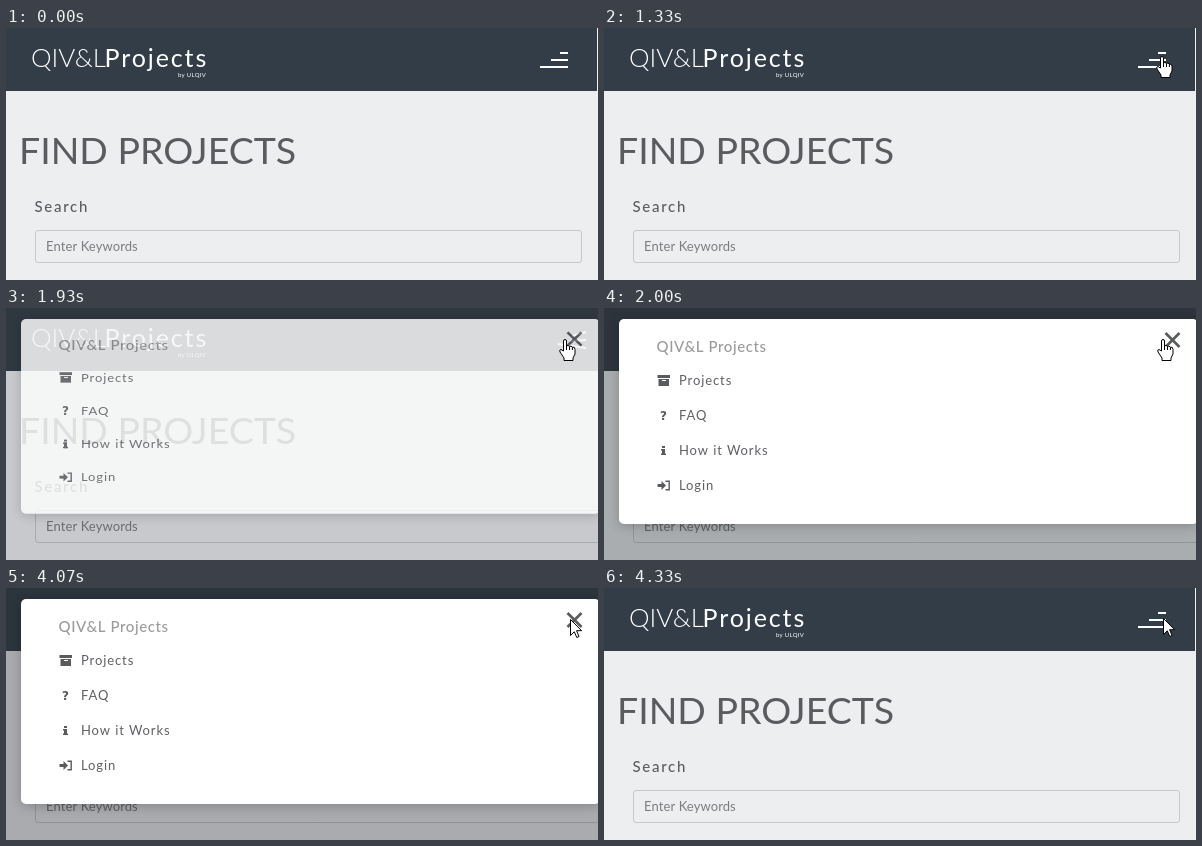
Animation of 592x252 px, one loop 5.54 s. Source, as an HTML page with a canvas:

```html
<!DOCTYPE html>
<html lang="en">
<head>
<meta charset="utf-8">
<title>Find projects</title>
<style>
html, body { margin: 0; width: 100%; height: 100%; overflow: hidden; background: #eceef0; }
canvas { display: block; }
</style>
</head>
<body>
<canvas id="stage" width="592" height="252"></canvas>
<script>
const W = 592, H = 252, LOOP = 5540, STEP = 1000 / 15;
const ctx = document.getElementById('stage').getContext('2d');
const layer = document.createElement('canvas');
layer.width = W;
layer.height = H;
const lc = layer.getContext('2d');

const INK = '#595b5f', BG = '#eceef0', BAR = '#333d47';

// Steps on which the dialog opens and closes
const OPEN = 28, CLOSE = 61;
const ALPHA = [[28, .31], [29, .82], [30, 1], [61, 1], [62, .69], [63, .3], [64, .08], [65, 0]];
const SCALE = [[28, .771], [29, .95], [30, 1], [61, 1], [62, .984], [63, .93], [64, .85], [65, .77]];
const SHADE = [[28, .02], [29, .18], [30, .32], [32, .34], [60, .34], [61, .33], [62, .24], [63, .12], [64, .04], [65, 0]];

function at(keys, n) {
  if (n < keys[0][0]) return 0;
  for (let i = 1; i < keys.length; i++) {
    const [a, u] = keys[i - 1], [b, v] = keys[i];
    if (n <= b) return u + (v - u) * (n - a) / (b - a);
  }
  return 0;
}

function text(c, str, x, y, size, weight, color, gap = 0, family = 'Lato, sans-serif') {
  c.font = `${weight} ${size}px ${family}`;
  c.letterSpacing = gap + 'px';
  c.fillStyle = color;
  c.fillText(str, x, y);
}

function box(c, x, y, w, h, r) {
  c.beginPath();
  c.roundRect(x, y, w, h, r);
}

function line(c, x1, y1, x2, y2, width, color) {
  c.beginPath();
  c.moveTo(x1, y1);
  c.lineTo(x2, y2);
  c.lineWidth = width;
  c.strokeStyle = color;
  c.stroke();
}

function burger(right, tilted) {
  const rows = tilted
    ? [[14, 28, 24], [16, 33, 32], [28, 36, 40]]
    : [[8, 25, 25], [17, 32, 32], [28, 39, 39]];
  for (const [len, y1, y2] of rows) line(ctx, right - len, y1, right, y2, 2, '#fff');
}

function page(width, tilted) {
  ctx.fillStyle = BG;
  ctx.fillRect(0, 0, W, H);
  ctx.fillStyle = BAR;
  ctx.fillRect(0, 0, width, 63);
  text(ctx, 'QIV&L', 25, 39, 26, 300, '#fff');
  text(ctx, 'Projects', 98.5, 39, 25, 400, '#fff', 1.9);
  text(ctx, 'by ULQIV', 172, 49, 6, 400, '#fff', .3);
  burger(width - 29, tilted);
  text(ctx, 'FIND PROJECTS', 13, 136, 37.5, 400, INK);
  text(ctx, 'Search', 28.5, 184, 15, 500, INK, 1.7);
  box(ctx, 29.5, 202.5, width - 45, 32, 2.5);
  ctx.lineWidth = 1;
  ctx.strokeStyle = '#c6c9cb';
  ctx.stroke();
  text(ctx, 'Enter Keywords', 40, 223, 13, 400, '#7b7d80', .1);
  ctx.fillStyle = '#f1f1f1';
  if (width < W) ctx.fillRect(width, 0, W - width, H);
}

function icons(c) {
  c.fillStyle = INK;
  c.fillRect(53.5, 67, 12.5, 3);
  c.fillRect(54.5, 71, 10.5, 7);
  c.fillStyle = '#fff';
  c.fillRect(58, 72, 4, 1);
  text(c, '?', 56, 112, 12, 700, INK, 0, '"DejaVu Sans", sans-serif');
  c.fillRect(58, 138, 3, 2);
  c.fillRect(57, 141, 4, 1.5);
  c.fillRect(58, 141, 3, 6);
  c.fillRect(57, 145.5, 5, 1.5);
  c.fillRect(53.5, 176, 4.5, 3);
  c.beginPath();
  c.moveTo(57.5, 173);
  c.lineTo(62, 177.5);
  c.lineTo(57.5, 182);
  c.fill();
  c.beginPath();
  c.moveTo(61.5, 173.2);
  c.lineTo(65.2, 173.2);
  c.lineTo(65.2, 181.8);
  c.lineTo(61.5, 181.8);
  c.lineWidth = 1.4;
  c.strokeStyle = INK;
  c.stroke();
}

function dialog(width, alpha, scale) {
  const c = lc;
  c.clearRect(0, 0, W, H);
  c.save();
  c.translate(0, 11);
  c.scale(1, scale);
  c.translate(0, -11);
  c.save();
  c.shadowColor = 'rgba(0,0,0,.22)';
  c.shadowBlur = 12;
  c.shadowOffsetY = 2;
  c.fillStyle = '#fff';
  box(c, 15, 11, width - 30, 205, 5);
  c.fill();
  c.restore();
  text(c, 'QIV&L Projects', 52.5, 44, 15, 500, '#9b9b9b', .6);
  ['Projects', 'FAQ', 'How it Works', 'Login'].forEach((s, i) =>
    text(c, s, 75, 77 + 35 * i, 13, 400, '#5f6063', .9));
  icons(c);
  const x = width - 40.5, y = 32;
  line(c, x - 7, y - 7, x + 7, y + 7, 2.6, INK);
  line(c, x - 7, y + 7, x + 7, y - 7, 2.6, INK);
  c.restore();
  ctx.globalAlpha = alpha;
  ctx.drawImage(layer, 0, 0);
  ctx.globalAlpha = 1;
}

function paint(path, x, y) {
  ctx.save();
  ctx.translate(x, y);
  ctx.lineJoin = 'round';
  ctx.lineWidth = 1;
  ctx.fillStyle = '#fff';
  ctx.strokeStyle = '#000';
  ctx.fill(path);
  ctx.stroke(path);
  ctx.restore();
}

// Both pointers have their hot spot at 0,0
const ARROW = new Path2D('M.5 .5V16.5L4.3 12.8L6.8 18.5L9 17.5L6.6 11.7H11.6Z');
const HAND = new Path2D('M-1.5 12V2Q-1.5 .5 0 .5T1.5 2V7Q3 5.6 4.5 7.4Q6 6.3 7.4 8.2Q10 7.4 10 10.5V15L8 19V21.5H-1V19L-5 13Q-6 10.5 -4 10.5Z');
const CREASES = new Path2D('M1.5 7V11M4.5 7.4V11M7.4 8.2V11');

function hand(x, y) {
  paint(HAND, x, y);
  paint(CREASES, x, y);
}

function pointer(n) {
  if (n < 7) return;
  if (n < 19) {
    const p = Math.min(1, (n - 7) / 9);
    const x = 553 + 27 * Math.max(0, 1 - p * 1.8) ** 1.5;
    const y = 23 + 173 * (1 - p) ** 1.717;
    paint(ARROW, Math.round(x), Math.round(y));
  } else if (n < 20) hand(558, 26);
  else if (n < OPEN) hand(558, 28);
  else if (n < 41) hand(559, 31);
  else if (n < 42) hand(560, 32);
  else if (n < 43) paint(ARROW, 562, 31);
  else if (n <= CLOSE) paint(ARROW, 564, 31);
  else paint(ARROW, 559, 30);
}

function draw(t) {
  const n = Math.floor((t + 4) / STEP);
  // The page is wider while its scrollbar is hidden
  const width = n >= OPEN && n <= CLOSE ? 609 : 591;
  page(width, n === OPEN || n === OPEN + 1);
  const shade = at(SHADE, n), alpha = at(ALPHA, n);
  if (shade > 0) {
    ctx.fillStyle = `rgba(32,36,40,${shade})`;
    ctx.fillRect(0, 0, width, H);
  }
  if (alpha > 0) dialog(width, alpha, at(SCALE, n));
  pointer(n);
}

const start = performance.now();
function tick() {
  draw((performance.now() - start) % LOOP);
  requestAnimationFrame(tick);
}
tick();
</script>
</body>
</html>
```
